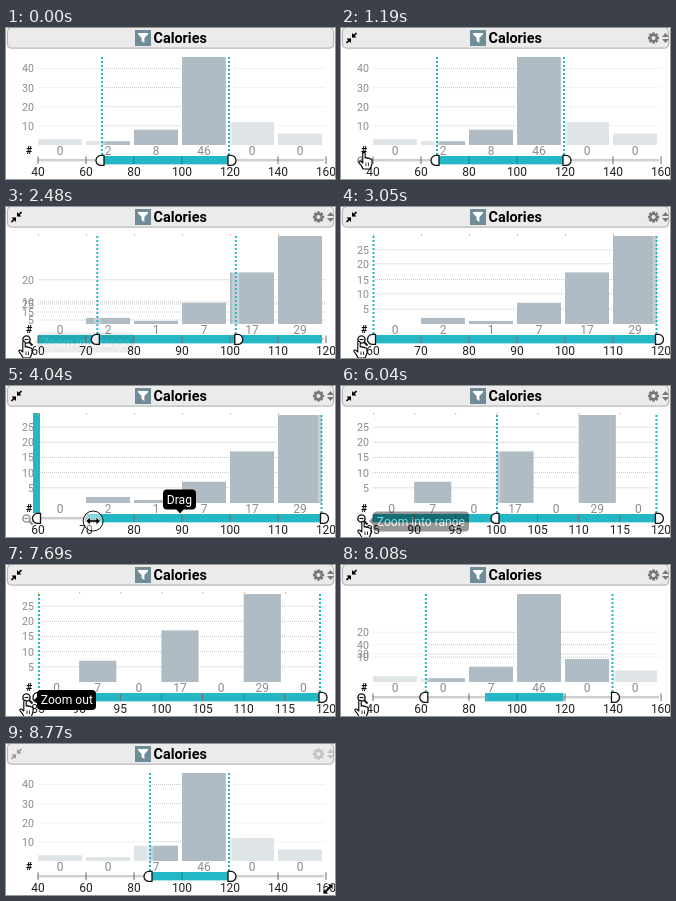
Write an HTML page that moves like this. It is 329 px wide and 151 px high and loops after 8870 ms.

```html
<!DOCTYPE html>
<html lang="en">
<head>
<meta charset="utf-8">
<title>Histogram filter</title>
<style>
html, body { margin: 0; width: 100%; height: 100%; overflow: hidden; background: #fff; }
svg { display: block; width: 329px; height: 151px; font-family: Roboto, "Liberation Sans", sans-serif; }
.title { font-size: 14.4px; font-weight: 700; }
.axis { font-size: 12px; fill: #222; text-anchor: middle; }
.count { font-size: 12px; fill: #8b8b8b; text-anchor: middle; }
.scale { font-size: 10.6px; fill: #8b8b8b; text-anchor: end; }
.tip { font-size: 12.1px; fill: #fff; }
</style>
</head>
<body>
<svg id="stage" viewBox="0 0 329 151"></svg>
<script>
const LOOP = 8870, LEFT = 32, WIDTH = 288, BASE = 117, TOP = 27;
const TEAL = '#24b8c6', BAR = '#afbcc4';
const ZOOM_IN = 2270, RELEASE = 4710, ZOOM_MORE = 5870, ZOOM_OUT = 7690, MOVE = 800;

const wide = { lo: 40, step: 20, bars: [3, 2, 8, 46, 12, 6], marks: [10, 20, 30, 40] };
const mid = { lo: 60, step: 10, bars: [0, 2, 1, 7, 17, 29], marks: [5, 10, 15, 20, 25] };
const near = { lo: 85, step: 5, bars: [0, 7, 0, 17, 0, 29, 0], marks: mid.marks };

// Pointer path: time, x, y
const path = [
  [230, 329, 40], [650, 150, 85], [1070, 30, 118], [1190, 23, 125], [1500, 18, 135],
  [3230, 18, 135], [3450, 32, 135], [3690, 32, 135], [4040, 87, 135], [4600, 160, 135],
  [4800, 160, 135], [5450, 22, 136], [6750, 22, 136], [7100, 19, 136],
  [8200, 19, 136], [8500, 170, 140], [8770, 322, 145]
];

// Range lines: time the move starts, left, right
const ranges = [
  [-MOVE, 96, 223], [ZOOM_IN, 32.5, 315.5], [RELEASE, 161, 315.5],
  [ZOOM_MORE, 33, 314], [ZOOM_OUT, 144, 223]
];

const stage = document.getElementById('stage');
const clamp = v => Math.max(0, Math.min(1, v));
const ramp = (t, start, length) => clamp((t - start) / length);
const mix = (a, b, p) => a + (b - a) * p;
const cubic = p => p < .5 ? 4 * p ** 3 : 1 - 4 * (1 - p) ** 3;
const rect = (x, y, w, h, fill, more = '') =>
  `<rect x="${x}" y="${y}" width="${Math.max(0, w)}" height="${h}" fill="${fill}" ${more}/>`;
const line = (x1, y1, x2, y2, stroke, more = '') =>
  `<line x1="${x1}" y1="${y1}" x2="${x2}" y2="${y2}" stroke="${stroke}" ${more}/>`;
const text = (x, y, kind, s) => `<text x="${x}" y="${y}" class="${kind}">${s}</text>`;
const shape = (d, fill, more = '') => `<path d="${d}" fill="${fill}" ${more}/>`;
const group = (x, y, body, more = '') => `<g transform="translate(${x} ${y})" ${more}>${body}</g>`;

function pointerAt(t) {
  if (t < path[0][0]) return null;
  let i = path.findIndex(p => p[0] > t);
  if (i < 0) i = path.length;
  const a = path[i - 1], b = path[i] || a;
  const p = ramp(t, a[0], b[0] - a[0] || 1);
  return [mix(a[1], b[1], p), mix(a[2], b[2], p)];
}

function rangeAt(t) {
  let i = ranges.length - 1;
  while (ranges[i][0] > t) i--;
  const to = ranges[i], from = ranges[i - 1] || to;
  const p = cubic(ramp(t, to[0], MOVE));
  return [mix(from[1], to[1], p), mix(from[2], to[2], p)];
}

function header(t) {
  const shown = Math.min(ramp(t, 230, 250), 1 - .65 * ramp(t, 8540, 230));
  let gear = '';
  for (let a = 0; a < 360; a += 45) gear += rect(-1.3, -5.6, 2.6, 3, '#777', `transform="rotate(${a})"`);
  gear += '<circle r="3.2" fill="none" stroke="#777" stroke-width="2.2"/>';
  const shrink = line(1, 11, 5, 7, '#000', 'stroke-width="1.7"') + line(7, 5, 11, 1, '#000', 'stroke-width="1.7"') +
    shape('M1 6.5H5.5V11ZM6.5 1V5.5H11Z', '#000');
  const sort = shape('M0 -1L3.5 -5L7 -1ZM0 1L3.5 5L7 1Z', '#777');
  return rect(.5, -1, 328, 22, '#dcdcdc', 'rx="5"') +
    rect(1.5, -.5, 326, 20.5, '#ebebeb', 'rx="4" stroke="#b8b8b8"') +
    rect(129, 2, 16, 16, '#718c99') +
    shape('M132 5H142V6.2L138.4 10V15L135.6 13V10L132 6.2Z', '#fff') +
    text(147.5, 15, 'title', 'Calories') +
    `<g opacity="${shown}">` + group(4.5, 4, shrink) + group(312.5, 10, gear) + group(321, 10, sort) + '</g>';
}

function viewAt(t) {
  if (t < 2250) return { view: wide, old: wide, start: 0, counts: [0, 2, 8, 46, 0, 0] };
  if (t < 5860) return { view: mid, old: wide, start: ZOOM_IN, counts: t < RELEASE ? mid.bars : [0, 0, 0, 7, 17, 29] };
  if (t < 7740) return { view: near, old: mid, start: ZOOM_MORE, counts: near.bars };
  return { view: wide, old: near, start: ZOOM_OUT, counts: [0, 0, 7, 46, 0, 0] };
}

function trackAt(t, pointer) {
  if (t < 2250) return [96, 222.5];
  if (t < 3690) return [32, 316];
  if (t < RELEASE) return [Math.max(32, pointer[0] - 6), 316];
  if (t < 5860) return [160, 316];
  if (t < 7740) return [32, 314];
  return [144, 222.5];
}

function chart(t, pointer) {
  const { view, old, start, counts } = viewAt(t);
  const [l, r] = rangeAt(t), [from, to] = trackAt(t, pointer);
  const unit = v => 88 / Math.max(...v.bars);
  const p = ramp(t, start, MOVE), n = view.bars.length, w = WIDTH / n;
  const zoomed = view !== wide;
  let out = '';

  for (const m of view.marks) {
    const before = old.marks.includes(m) ? BASE - m * unit(old) : BASE;
    const y = mix(before, BASE - m * unit(view), p);
    out += line(32, y, 320, y, '#c4c4c4', 'stroke-dasharray="1 1"') + text(28, y + 4, 'scale', m);
  }
  view.bars.forEach((v, i) => {
    const h = v * unit(view);
    out += rect(LEFT + i * w, BASE - h, w - 4, h, BAR);
  });
  if (!zoomed || (t >= RELEASE && t < 5860)) {
    out += rect(LEFT, TOP, l - LEFT, BASE - TOP, '#fff', 'opacity=".6"');
    if (!zoomed) out += rect(r, TOP, 320 - r, BASE - TOP, '#fff', 'opacity=".6"');
  }
  view.bars.forEach((v, i) => { out += text(LEFT + i * w + w / 2 - 2, 127, 'count', counts[i]); });
  out += '<text x="20" y="126" font-size="10.5" font-weight="700">#</text>';

  const held = t >= 3450 && t < RELEASE;
  const rule = x => rect(x - 3.5, TOP, 7, 90, '#fff', 'opacity=".3"') +
    line(x, TOP, x, 127, TEAL, 'stroke-width="2" stroke-dasharray="2 2" stroke-dashoffset="2"');
  out += (held ? rect(l - 5.5, TOP, 7, 100, TEAL) : rule(l)) + rule(r);

  out += rect(LEFT, 131, 286, 2.4, '#cfcfcf') + rect(from, 128, to - from, 8.4, TEAL);
  for (let i = 0; i <= n; i++) {
    const x = LEFT + i * w;
    const inside = x > from && x < to;
    out += line(x, 128.5, x, 136, inside ? (zoomed ? '#8d6666' : '#167f89') : '#666');
    if (zoomed && i < n) out += line(x + .5, TOP, x + .5, TOP + 1.5, '#f0a070');
    out += text(x, 148.3, 'axis', view.lo + i * view.step);
  }
  const knob = 'stroke="#111" stroke-width="1.3"';
  out += group(l - 1, 132.4, shape('M3 -5V5H0A5 5 0 0 1 0 -5Z', '#fff', knob));
  out += group(r + 2, 132.4, shape('M-3 -5V5H0A5 5 0 0 0 0 -5Z', '#fff', knob));
  return out;
}

function zoomIcon(t) {
  if (t < 400 || t > 8650) return '';
  const over = (t > 1250 && t < 3300) || (t > 5400 && t < 8230);
  const plus = t < 2250 || (t >= RELEASE && t < 5860);
  const color = over ? '#111' : '#888';
  return group(20.5, 132.5, `<circle r="3.6" fill="#fff" stroke="${color}" stroke-width="1.4"/>` +
    line(2.6, 2.6, 6, 6, color, 'stroke-width="1.9"') + line(-2, 0, 2, 0, color, 'stroke-width="1.2"') +
    (plus ? line(0, -2, 0, 2, color, 'stroke-width="1.2"') : ''));
}

function tip(x, y, w, label, opacity, arrow) {
  if (opacity <= 0) return '';
  return `<g opacity="${opacity}">` + rect(x, y, w, 20, '#000', 'rx="4"') + shape(arrow, '#000') +
    text(x + 3.8, y + 14.3, 'tip', label) + '</g>';
}

function tips(t) {
  const fade = (a, b, wait, length) => Math.min(ramp(t, a, 90), 1 - ramp(t, b + wait, length));
  const side = 'M32 131L28 135L32 139Z';
  return tip(32, 125.5, 96, 'Zoom into range', fade(1500, ZOOM_IN, 100, 120), side) +
    tip(32, 125.5, 96, 'Zoom into range', fade(5550, ZOOM_MORE, 100, 120), side) +
    tip(31, 125, 59, 'Zoom out', fade(7240, ZOOM_OUT, 100, 120), side) +
    tip(157, 103.5, 33, 'Drag', fade(3720, 4640, 0, 100), 'M170 123L174 127.5L178 123Z');
}

function cursor(t, pointer) {
  if (!pointer) return '';
  const edge = 'stroke="#000" stroke-width="1.1" stroke-linejoin="round"';
  const arrows = shape('M-7 0L-3 -4V-1.2H3V-4L7 0L3 4V1.2H-3V4Z', '#000', 'stroke="#fff" stroke-width=".6"');
  let body;
  if (t >= 3400 && t < 4800) {
    const pressed = t >= 3690 && t < 4640;
    body = (pressed ? '<circle r="10" fill="#fff" fill-opacity=".45" stroke="#111"/>' : '') + arrows;
  } else if (t >= 8640) {
    body = `<g transform="rotate(-45)">${arrows}</g>`;
  } else if ((t > 1070 && t < 3400) || (t > 5380 && t < 8230)) {
    body = shape('M-1.2 0Q0 -1.4 1.2 0V5Q2.5 4 3.6 5.4Q5 4.7 6 6Q7.5 5.5 8 7V11Q7 14 6 16H-1Q-2 13 -5 9.6Q-5.4 7.5 -3.2 8.2L-1.2 10Z', '#fff', edge) +
      line(2, 9.5, 2, 13, '#000', 'stroke-width=".8"') + line(4.5, 9.5, 4.5, 13, '#000', 'stroke-width=".8"');
  } else {
    body = shape('M0 0V13L3 10.2L5 15L7 14.1L5 9.5H9Z', '#000', 'stroke="#fff" stroke-width=".8"');
  }
  return group(pointer[0], pointer[1], body);
}

function draw(now) {
  const t = now % LOOP, pointer = pointerAt(t);
  stage.innerHTML = header(t) + chart(t, pointer) + zoomIcon(t) + tips(t) + cursor(t, pointer);
}

const begin = performance.now();
function tick() {
  draw(performance.now() - begin);
  requestAnimationFrame(tick);
}
tick();
</script>
</body>
</html>
```
